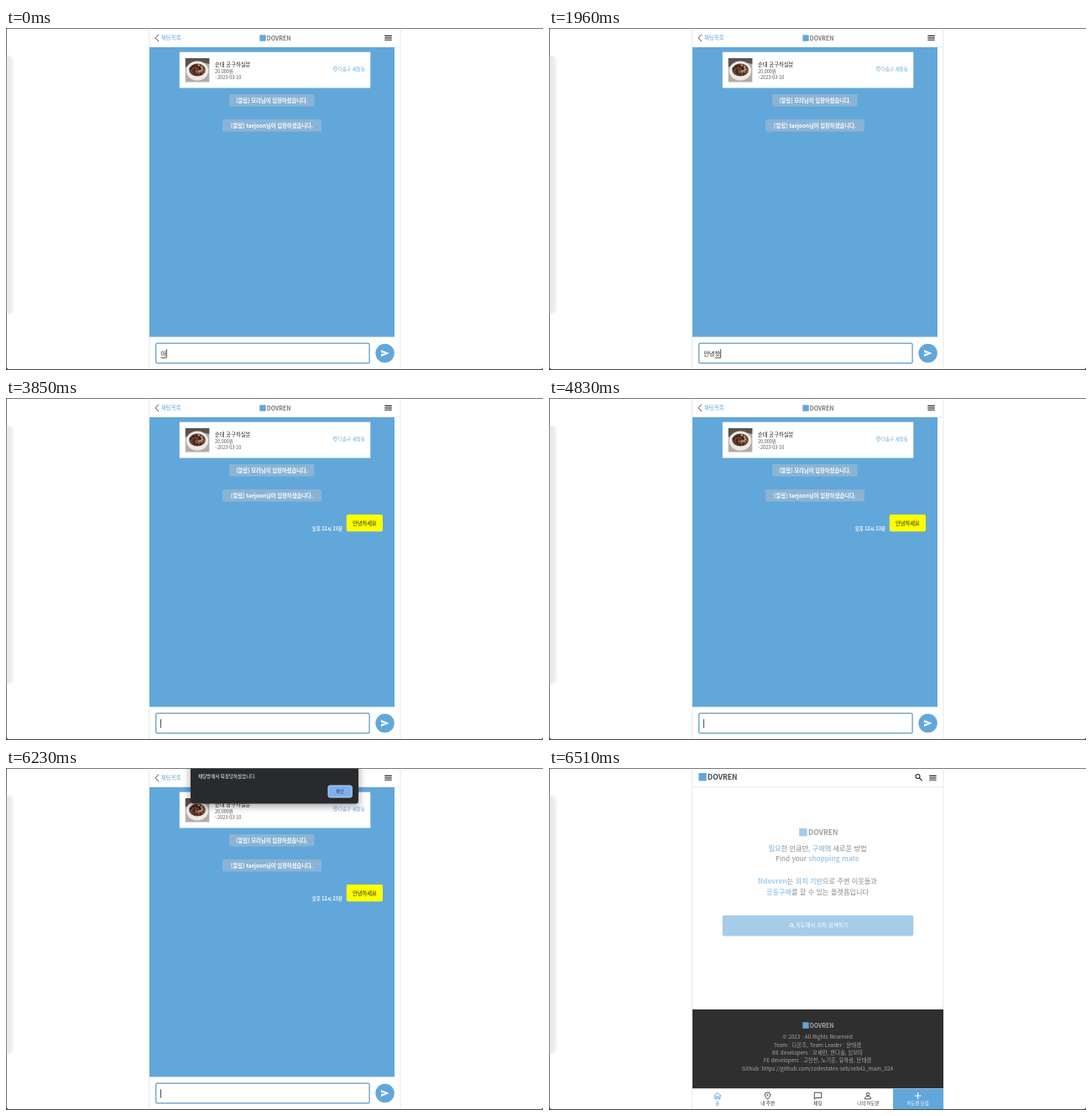
An HTML page for the animation above (6.58 s loop, 640x408 px).

```html
<!DOCTYPE html>
<html lang="ko">
<head>
<meta charset="utf-8">
<title>Chat room</title>
<style>
html, body { margin: 0; width: 100%; height: 100%; overflow: hidden; background: #fff; }
svg { display: block; width: 100vw; height: 100vh; }
text { font-family: "Noto Sans CJK KR", "Noto Sans KR", "Noto Sans CJK", "Noto Sans CJK JP", sans-serif; font-size: 6.38px; fill: #333; }
.xs { font-size: 5.5px; }
.md { font-size: 7.28px; }
.lg { font-size: 8.2px; }
.logo { font-size: 8.6px; font-weight: 700; }
.logo.s { font-size: 6.9px; }
.mid { text-anchor: middle; }
.b { font-weight: 700; }
.m { font-weight: 500; }
.w { fill: #fff; }
.blue { fill: #62a7da; }
.gray { fill: #777; }
.foot text { fill: #a8a8a8; }
.line { fill: none; stroke: #333; stroke-width: .9; stroke-linejoin: round; }
</style>
</head>
<body>
<svg viewBox="0 0 640 408" preserveAspectRatio="none">
  <defs>
    <linearGradient id="side"><stop offset="0" stop-color="#dadada"/><stop offset="1" stop-color="#f3f3f3"/></linearGradient>
    <filter id="soft" x="-50%" y="-10%" width="200%" height="120%"><feGaussianBlur stdDeviation="1"/></filter>
    <filter id="drop" x="-20%" y="-50%" width="140%" height="220%"><feGaussianBlur stdDeviation="4"/></filter>
    <clipPath id="thumb"><rect x="213.8" y="36" width="28.5" height="28.5"/></clipPath>
    <clipPath id="win"><path d="M.8 .8H640V404Q640 407 637 407H3.8Q.8 407 .8 404Z"/></clipPath>
  </defs>
  <rect width="640" height="408" fill="#4a4a4a"/>
  <g clip-path="url(#win)">
    <rect width="640" height="408" fill="#fff"/>
    <rect x="-8" y="33" width="17" height="308" rx="6" fill="url(#side)" filter="url(#soft)"/>
    <path d="M170.6 0V408M470 0V408" stroke="#e2e2e2" stroke-width=".8"/>
    <path d="M171 22.6H470" stroke="#e2e2e2" stroke-width=".7"/>

    <g id="chat">
      <path d="M182 7.6L178 11.8L182 16" class="line"/>
      <text x="185" y="14.2" class="blue">채팅목록</text>
      <rect x="302.3" y="8.3" width="7.4" height="7.4" class="blue"/>
      <text x="310.8" y="14.5" class="logo s gray">DOVREN</text>
      <path d="M451.3 9.4H459.8M451.3 11.9H459.8M451.3 14.3H459.8" stroke="#222" stroke-width="1.1"/>
      <rect x="171" y="23" width="292" height="345.5" class="blue"/>
      <rect x="206.8" y="28.7" width="227.5" height="42.8" fill="#fff"/>
      <g clip-path="url(#thumb)">
        <rect x="213" y="36" width="30" height="29" fill="#b3aba6"/>
        <path d="M213 36H243V43L228 40L213 47Z" fill="#5d514d"/>
        <ellipse cx="228" cy="51" rx="13.2" ry="11.6" fill="#ece8e6"/>
        <ellipse cx="228" cy="50" rx="9.8" ry="7.4" fill="#5b3a2c"/>
        <g id="food"></g>
      </g>
      <text x="249" y="45.7" class="m" style="font-size:6.3px;fill:#222">순대 공구하실분</text>
      <text x="249" y="53.6" class="xs" style="fill:#555">20,000원</text>
      <text x="249" y="60.8" class="xs" style="fill:#555">~2023-03-10</text>
      <path d="M392.5 51.9C390.9 49.9 390.3 49 390.3 48.2A2.2 2.2 0 0 1 394.7 48.2C394.7 49 394.1 49.9 392.5 51.9Z" fill="none" stroke="#62a7da" stroke-width=".7"/>
      <circle cx="392.5" cy="48.2" r=".7" class="blue"/>
      <text x="396" y="51.2" class="xs blue">다솜구 새들동</text>
      <g fill="#8ab3d4">
        <rect x="266" y="79" width="101.5" height="14.4" rx="1.8"/>
        <rect x="258" y="109" width="118" height="14.4" rx="1.8"/>
      </g>
      <text x="317" y="88.5" class="mid b w" style="font-size:6.3px">[알림] 모리님이 입장하셨습니다.</text>
      <text x="317" y="118.5" class="mid b w" style="font-size:6.3px">[알림] taejoon님이 입장하셨습니다.</text>
      <g id="sent">
        <rect x="405.8" y="139" width="43.2" height="20.3" rx="2" fill="#ff0"/>
        <text x="427.4" y="151.7" class="mid" style="font-size:6.3px;fill:#222">안녕하세요</text>
        <text x="401" y="157.9" class="xs b w" text-anchor="end">오후 12시 23분</text>
      </g>
      <rect x="178.7" y="376.2" width="254.4" height="23.6" rx="1.6" fill="#fff" stroke="#5a98c4" stroke-width="1.2"/>
      <text id="typed" x="184.2" y="391" class="md" style="fill:#222"></text>
      <rect id="under" y="393" width="6.5" height=".7" fill="#222"/>
      <rect id="caret" y="383.2" width=".8" height="10.4" fill="#222"/>
      <circle cx="451.6" cy="388" r="11.2" class="blue"/>
      <path d="M447 392.1L456.6 388L447 383.9V387.1L453.5 388L447 388.9Z" fill="#fff"/>
    </g>

    <g id="home">
      <rect x="178.4" y="6" width="9.3" height="9.4" class="blue"/>
      <text x="189" y="14" class="logo" style="fill:#484848">DOVREN</text>
      <g class="line" style="stroke:#222;stroke-width:1.1">
        <circle cx="439.5" cy="10" r="2.5"/><path d="M441.4 11.9L444.8 15.2"/>
        <path d="M453.2 9.4H461.6M453.2 11.9H461.6M453.2 14.3H461.6"/>
      </g>
      <g id="hero">
        <rect x="298.2" y="72" width="9.4" height="9.4" class="blue"/>
        <text x="309" y="79.9" class="logo" style="fill:#555">DOVREN</text>
        <g class="mid">
          <text x="320" y="98.5" class="lg"><tspan class="blue b">필요</tspan>한 만큼만, <tspan class="blue b">구매</tspan>의 새로운 방법</text>
          <text x="320" y="110.8" class="lg">Find your <tspan class="blue b">shopping mate</tspan></text>
          <text x="320" y="138" class="lg"><tspan class="blue b">Ndovren</tspan>는 <tspan class="blue b">위치 기반</tspan>으로 주변 이웃들과</text>
          <text x="320" y="150.5" class="lg"><tspan class="blue b">공동구매</tspan>를 할 수 있는 플랫폼입니다</text>
        </g>
        <rect x="206.8" y="175.8" width="227.5" height="24.6" rx="1.8" class="blue"/>
        <g class="line" style="stroke:#fff"><circle cx="289" cy="187.3" r="1.8"/><path d="M290.3 188.6L292.8 191"/></g>
        <text x="294" y="190.4" class="w">지도에서 위치 검색하기</text>
      </g>
      <rect x="171" y="288" width="299" height="94.5" fill="#2f2f2f"/>
      <g class="foot mid" id="foot">
        <rect x="302.3" y="303.3" width="7.4" height="7.4" class="blue"/>
        <text x="310.8" y="309.6" class="logo s" text-anchor="start" style="text-anchor:start">DOVREN</text>
      </g>
      <rect x="171" y="382.5" width="299" height="25" fill="#fff"/>
      <rect x="410" y="382.5" width="60" height="25" class="blue"/>
      <g class="line">
        <path d="M196.6 391.2L200.8 387.3L205 391.2M197.8 390.4V394.8H199.7V392H201.9V394.8H203.8V390.4" stroke="#4a9ad6"/>
        <path d="M260.5 395.3C258 392.3 257.3 391.1 257.3 390.1A3.2 3.2 0 0 1 263.7 390.1C263.7 391.1 263 392.3 260.5 395.3Z"/>
        <circle cx="260.5" cy="390.1" r=".7"/>
        <path d="M316.3 395.2V387.2H324.7V393.5H318Z"/>
        <circle cx="380" cy="389.2" r="1.8"/>
        <path d="M376.5 394.8V393.8C376.5 392.2 378.6 391.7 380 391.7S383.5 392.2 383.5 393.8V394.8Z"/>
        <path d="M439.7 387.1V394.9M435.8 391H443.6" stroke="#fff" style="stroke-width:1.1"/>
      </g>
      <g class="mid" id="tabs"></g>
    </g>

    <g id="dialog">
      <rect x="219" y="-20" width="202" height="66" rx="4" opacity=".35" filter="url(#drop)"/>
      <rect x="220" y="-20" width="200" height="62.4" rx="3" fill="#282a2d"/>
      <text x="229" y="11.6" class="xs m w">채팅방에서 퇴장당하셨습니다.</text>
      <rect id="ok" x="384" y="21" width="28.3" height="14" rx="2"/>
      <text x="398.1" y="29.8" class="mid m" style="font-size:5.2px;fill:#23324c">확인</text>
    </g>
  </g>
</svg>
<script>
const LOOP = 6580, SEND = 2410, BLINK = 530, PAGE = 6290;
const $ = id => document.getElementById(id);
const clamp = v => Math.max(0, Math.min(1, v));
const show = (id, on) => $(id).setAttribute('display', on ? 'inline' : 'none');
const label = (x, y, s, cls, fill) =>
  `<text x="${x}" y="${y}" class="${cls}"${fill ? ` style="fill:${fill}"` : ''}>${s}</text>`;

// keystrokes: start time and the text so far
const keys = [
  [0, '아'], [65, '안'], [415, '안ㄴ'], [625, '안녀'], [835, '안녕'], [1255, '안녕ㅎ'],
  [1605, '안녕하'], [1955, '안녕핫'], [2025, '안녕하세'], [2165, '안녕하셍'],
  [2235, '안녕하세요'], [SEND, '']
];

$('foot').innerHTML += [
  '© 2023 · All Rights Reserved',
  'Team : 다온조, Team Leader : 문태겸',
  'BE developers : 오세란, 한다솔, 임보미',
  'FE developers : 고민찬, 노기훈, 유하람, 문태겸',
  'Github :https://github.com/codestates-seb/seb41_main_024'
].map((s, i) => label(320, 323.3 + 9.3 * i, s, '')).join('');

$('tabs').innerHTML = ['홈', '내 주변', '채팅', '나의 N도렌', 'N도렌 모집'].map((s, i) =>
  label(200.8 + 59.8 * i, 402.4, s, 'xs', ['#4a9ad6', '', '', '', '#fff'][i])).join('');

const tones = ['#2f1d17', '#8d5a3c', '#744431', '#c29a77', '#40271d'];
$('food').innerHTML = Array.from({ length: 26 }, (_, i) => {
  const a = i * 2.4, r = Math.sqrt(i / 26);
  return `<circle cx="${228 + 8.6 * r * Math.cos(a)}" cy="${50 + 6 * r * Math.sin(a)}" r="1.3" fill="${tones[i % 5]}"/>`;
}).join('');

function dialogLevel(t) {
  if (t < 5500) return 1 - (1 - clamp((t - 4930) / 330)) ** 3;
  return 1 - clamp((t - 6265) / 140);
}

function draw(t) {
  const chat = t < PAGE;
  show('chat', chat);
  show('home', !chat);
  show('sent', t >= SEND);

  const text = keys.filter(k => k[0] <= t).pop()[1];
  const end = 184.2 + 6.7 * text.length;
  $('typed').textContent = text;
  $('under').setAttribute('x', end - 6.6);
  show('under', text);
  $('caret').setAttribute('x', end);
  show('caret', t < SEND || t > 4900 || Math.floor((t - SEND) / BLINK) % 2 === 0);

  const v = dialogLevel(t), s = 0.96 + 0.04 * v;
  show('dialog', v > 0);
  $('dialog').setAttribute('opacity', v);
  $('dialog').setAttribute('transform', `translate(${320 * (1 - s)} ${-11 * (1 - v)}) scale(${s})`);
  const press = t > 6160;
  $('ok').setAttribute('fill', press ? '#7fb0ec' : '#8ab4f8');
  $('ok').setAttribute('stroke', press ? '#b9d5fa' : 'none');

  $('hero').setAttribute('opacity', clamp((t - 6300) / 370));
}

const start = performance.now();
function tick() {
  draw((performance.now() - start) % LOOP);
  requestAnimationFrame(tick);
}
draw(0);
requestAnimationFrame(tick);
</script>
</body>
</html>
```
